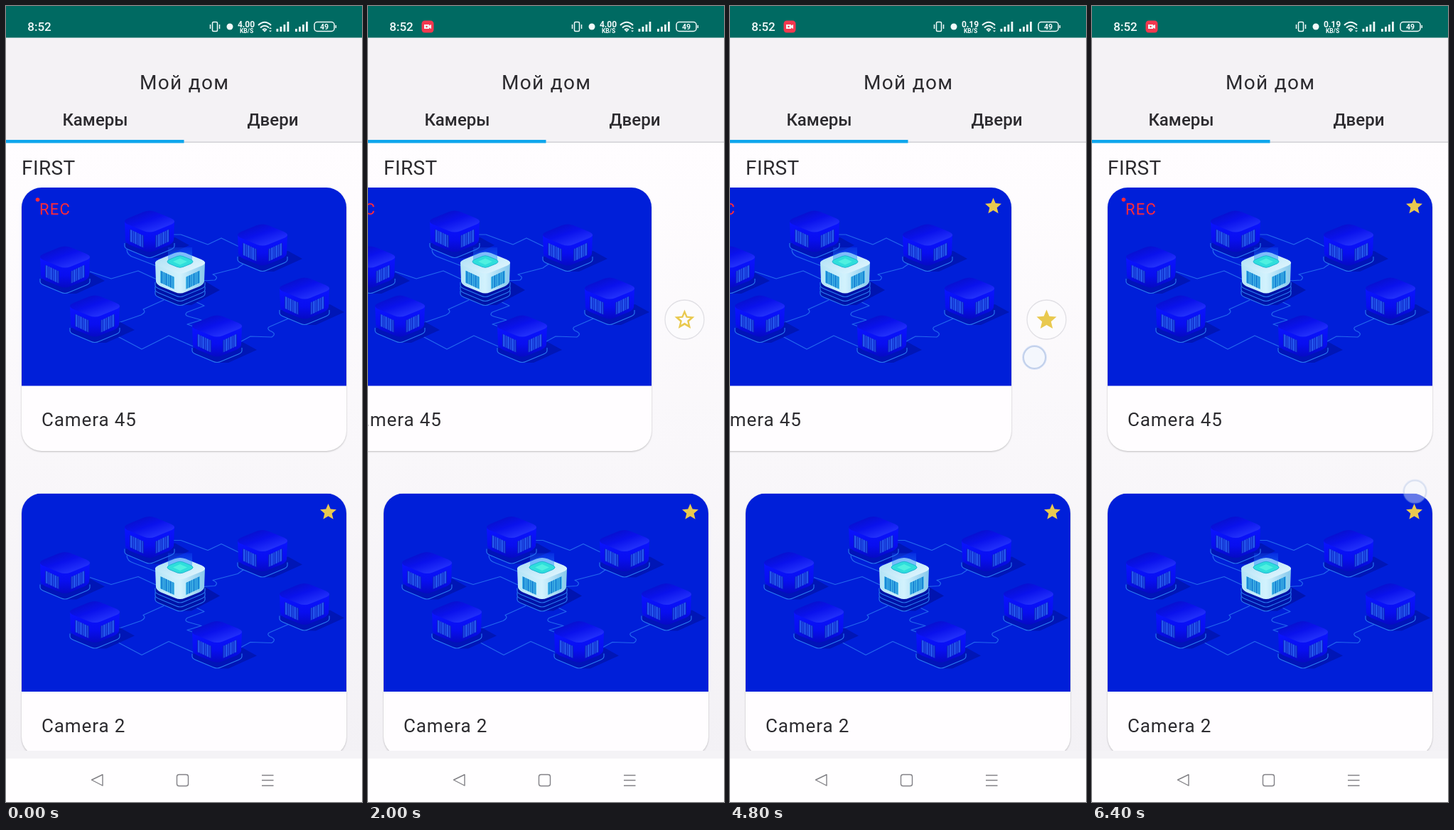
An HTML page that plays this animation: 501x1118 px, repeating every 6.5 s.

```html
<!DOCTYPE html>
<html lang="ru">
<head>
<meta charset="utf-8">
<title>Мой дом</title>
<style>
  html, body { margin: 0; height: 100%; overflow: hidden; background: #f4f3f6; }
  svg { display: block; width: 100%; height: 100%; font-family: Roboto, sans-serif; fill: #2c2b2f; }
  .title { font-size: 28px; letter-spacing: 1.3px; }
  .section { font-size: 28px; letter-spacing: .4px; }
  .tab { font-size: 24px; font-weight: 500; text-anchor: middle; }
  .name { font-size: 26px; letter-spacing: .9px; }
  .rec { font-size: 22px; letter-spacing: 1.2px; fill: #ff2b38; }
  .status { fill: #f2fafa; }
  .status text { font-weight: 700; text-anchor: middle; }
  .line { fill: none; stroke: #f2fafa; stroke-width: 1.5; }
  .nav { fill: none; stroke: #828186; stroke-width: 1.4; }
  .card { filter: drop-shadow(0 1px 1px rgba(0, 0, 0, .24)); }
  .star { fill: #e9c94f; }
  .blue { --top: url(#blueTop); --side: url(#blueSide); --panel: #0c22c4; --bars: #2457ee; --base: #0014b8; }
  .white { --top: url(#whiteTop); --side: url(#whiteSide); --panel: #4fc0ea; --bars: #1a86d6; --base: #0013a8; }
</style>
</head>
<body>
<svg viewBox="0 0 501 1118">
  <defs>
    <linearGradient id="page" x2="0" y2="1">
      <stop stop-color="#fffdff"/><stop offset="1" stop-color="#f3f1f5"/>
    </linearGradient>
    <linearGradient id="blueTop" x2=".8" y2="1">
      <stop stop-color="#0510bc"/><stop offset=".5" stop-color="#0a12ec"/><stop offset="1" stop-color="#2b3cff"/>
    </linearGradient>
    <linearGradient id="blueSide" x2="0" y2="1">
      <stop stop-color="#0a14ff"/><stop offset=".6" stop-color="#080ef0"/><stop offset="1" stop-color="#060ac4"/>
    </linearGradient>
    <linearGradient id="whiteTop" x2="1" y2="1">
      <stop stop-color="#a9def4"/><stop offset="1" stop-color="#e6f8ff"/>
    </linearGradient>
    <linearGradient id="whiteSide">
      <stop stop-color="#b4e4f6"/><stop offset=".5" stop-color="#d2f2fd"/><stop offset="1" stop-color="#86c8ec"/>
    </linearGradient>
    <linearGradient id="beam" x2="0" y2="1">
      <stop stop-color="#1a60ff" stop-opacity=".25"/><stop offset="1" stop-color="#28a0ff" stop-opacity=".55"/>
    </linearGradient>
    <clipPath id="photo"><path d="M22 533.600V283a28 28 0 0 1 28-28H451a28 28 0 0 1 28 28V533.600z"/></clipPath>

    <path id="star" d="M0-10 2.8-3.4 10-2.8 4.5 2 6.2 9 0 5.3-6.2 9-4.5 2-10-2.8-2.8-3.4z"/>
    <g id="panel" transform="skewY(25)" stroke-width="17">
      <path d="M-28 48H-8" style="stroke:var(--panel)"/>
      <path d="M-27 48H-9" stroke-dasharray="2.600 1.200 1.400 1" style="stroke:var(--bars)"/>
    </g>
    <g id="body">
      <path d="M-35 15-34 42Q-33 46-27 49L-7 57Q0 60 7 57L27 49Q33 46 34 42L35 15z" style="fill:var(--side)"/>
      <use href="#panel"/><use href="#panel" transform="scale(-1 1)"/>
      <path d="M-30 11-8 2Q0-1 8 2L30 11Q40 15.500 30 20L8 29Q0 32-8 29L-30 20Q-40 15.500-30 11z" style="fill:var(--top)"/>
    </g>
    <path id="plate" d="M-35 46v4Q-35 53-30 55L-6 65Q0 68 6 65L30 55Q35 53 35 50v-4" stroke="#2b7df2" stroke-width="1.1" style="fill:var(--base)"/>
    <g id="cube">
      <path d="M0 67 16 67 56 49 36 38-20 50z" fill="#0016b6"/>
      <use href="#plate"/><use href="#body"/>
    </g>

    <g id="scene" clip-path="url(#photo)">
      <path d="M22 255H479V534H22z" fill="#001fd9"/>
      <path fill="none" stroke="#2468ee" stroke-width="1.2" stroke-linejoin="round"
        d="M236 321H246L284 335 303 326 328 338M118 373 148 383 186 372 212 384M170 342Q170 350 180 353L214 366
           M158 445 190 434Q198 430 193 426L222 413M157 464 191 482 229 463 263 478M262 413 279 421 255 430Q250 434 257 436L275 441 255 447 292 460
           M277 386 294 385Q300 381 291 377L326 368 336 361M331 471 344 464 374 465Q382 460 371 456 366 452 372 450L402 437"/>
      <g class="blue">
        <use href="#cube" x="202" y="287"/><use href="#cube" x="361" y="306"/><use href="#cube" x="83" y="337"/>
      </g>
      <g class="white" transform="translate(245 345)">
        <path d="M0 75H16L56 54 36 42-30 54z" fill="#0014b0"/>
        <use href="#plate" y="9"/><use href="#plate" y="3"/><use href="#plate" y="-3"/>
        <use href="#body"/>
        <path d="M-17-6H17V14H-17z" fill="url(#beam)"/>
        <path d="M-15 11-4 6.500Q0 5 4 6.500L15 11Q21 14 15 17L4 21.500Q0 23-4 21.500L-15 17Q-21 14-15 11z" fill="#2fdedb" stroke="#1fb4d4"/>
        <path d="M-10 14 0 9.500 10 14 0 18.500z" fill="#4ff0e0"/>
      </g>
      <g class="blue">
        <use href="#cube" x="420" y="381"/><use href="#cube" x="125" y="406"/><use href="#cube" x="297" y="434"/>
      </g>
    </g>
    <g id="card">
      <rect class="card" x="22" y="255" width="457" height="370" rx="28" fill="#fffdff"/>
      <use href="#scene"/>
    </g>
    <path id="bars" d="M0 32h2.800v4H0zM5 29h2.800v7H5zM10 26h2.800v10H10zM15 22h2.800v14H15z"/>
  </defs>

  <rect width="501" height="1118" fill="#f4f3f6"/>
  <rect y="192" width="501" height="865" fill="url(#page)"/>
  <text class="section" x="22" y="237">FIRST</text>

  <g transform="translate(445.500 440.500)">
    <circle r="27.500" fill="#fcfbfd" stroke="#e1e0e5" stroke-width="1.300"/>
    <use class="star" href="#star" transform="scale(1.400)"/>
    <use id="hole" href="#star" transform="scale(.800)" fill="#fcfbfd"/>
    <circle id="ripple" r="27.500" fill="#007f80"/>
  </g>

  <g id="slider">
    <use href="#card"/>
    <circle cx="44.500" cy="272" r="2.800" fill="#ff2b38"/>
    <text class="rec" x="47" y="293">REC</text>
    <use id="favorite" class="star" href="#star" transform="translate(453.500 281) scale(1.150)"/>
    <text class="name" x="50" y="590">Camera 45</text>
  </g>
  <g transform="translate(0 429.500)">
    <use href="#card"/>
    <use class="star" href="#star" transform="translate(453.500 281) scale(1.150)"/>
    <text class="name" x="50" y="590">Camera 2</text>
  </g>

  <rect y="1046" width="501" height="11" fill="#f4f3f6"/>
  <rect y="1057" width="501" height="61" fill="#fffeff"/>
  <path class="nav" stroke-linejoin="round" d="M120.500 1087 136 1079.500V1095zM360 1080.500h16.500M360 1087.500h16.500M360 1095h16.500"/>
  <rect class="nav" x="240.500" y="1079.500" width="16" height="16" rx="3"/>

  <rect y="44" width="501" height="148" fill="#f4f2f5"/>
  <text class="title" x="188" y="117">Мой дом</text>
  <text class="tab" x="125.500" y="168">Камеры</text>
  <text class="tab" x="375.500" y="168">Двери</text>
  <rect x="250" y="190.500" width="251" height="1.500" fill="#d2d1d6"/>
  <rect y="188" width="250.500" height="4.500" fill="#0fa6ec"/>

  <rect width="501" height="44.500" fill="#006a62"/>
  <g class="status">
    <text x="47" y="35" font-size="17" style="font-weight:500">8:52</text>
    <g id="recorder">
      <rect x="75.500" y="20.500" width="17" height="17" rx="4.500" fill="#f2384f"/>
      <path d="M79 26h7v1.500l3-1.500v6l-3-1.500V32h-7z"/>
      <circle cx="82.500" cy="29" r="1.200" fill="#f2384f"/>
    </g>
    <rect class="line" x="290.500" y="22.500" width="7" height="13" rx="1.500"/>
    <path class="line" d="M287.500 26v6M300.500 26v6"/>
    <circle cx="315" cy="29" r="4.500"/>
    <text id="speed" x="338" y="30" font-size="12">4.00</text>
    <text x="338.500" y="38" font-size="8.500">KB/S</text>
    <path class="line" d="M355 27Q364 18.500 373 27M358 30.500Q364 25 370 30.500M361 33.500Q364 31 367 33.500" style="stroke-width:2.100"/>
    <path d="M361.500 34 364 36.500 366.500 34zM370 32l2-2 2 2zM370 34.500l2 2 2-2z"/>
    <use href="#bars" x="380.500"/><use href="#bars" x="407"/>
    <rect class="line" x="434" y="22.500" width="28" height="13" rx="4"/>
    <path d="M463.500 27h1.500v4h-1.500z"/>
    <text x="448" y="33" font-size="10.500">49</text>
  </g>

  <g id="touch">
    <circle r="17.500" fill="#86aef0" opacity=".25"/>
    <circle r="15.500" fill="#fff" fill-opacity=".68" stroke="#b4c6e6" stroke-opacity=".75" stroke-width="2"/>
  </g>
</svg>
<script>
  const LOOP = 6500, STEP = 100;
  const el = id => document.getElementById(id);
  const show = (id, value) => el(id).setAttribute('opacity', value);
  const move = (id, x, y) => el(id).setAttribute('transform', `translate(${x} ${y})`);

  // Linear interpolation through [time, value] pairs, held at both ends
  function track(t, keys) {
    const i = keys.findIndex(([time]) => time > t);
    if (i === 0) return keys[0][1];
    if (i < 0) return keys[keys.length - 1][1];
    const [t0, v0] = keys[i - 1], [t1, v1] = keys[i];
    return v0 + (v1 - v0) * (t - t0) / (t1 - t0);
  }

  const SLIDE = [[1450, 0], [1600, -22], [1800, -66], [1900, -75], [2000, -80], [2100, -82], [2200, -83],
                 [4800, -83], [4900, -62], [5000, -28], [5100, -8], [5200, -1.5], [5300, 0]];
  const TOUCH = [[1300, 0], [1400, 1], [1700, 1], [1900, 0], [2400, 0], [2500, 1], [2600, 1], [2800, 0],
                 [4600, 0], [4800, 1], [5000, 1], [5200, 0], [6200, 0], [6400, .55]];
  const RIPPLE = [[2500, 0], [2700, .18], [2800, .18], [3100, 0]];

  function touchPoint(t, slide) {
    if (t < 2300) return [438.5 + slide, 523];
    if (t < 3500) return [446, 446];
    if (t < 5500) return [428.5 + (slide + 83) * .35, 493.5];
    return [454.5, 682];
  }

  function draw() {
    const t = Math.floor(performance.now() % LOOP / STEP) * STEP;
    const slide = track(t, SLIDE), liked = t >= 2700;
    move('slider', slide, 0);
    move('touch', ...touchPoint(t, slide));
    show('touch', track(t, TOUCH));
    show('ripple', track(t, RIPPLE));
    show('recorder', track(t, [[600, 0], [900, 1]]));
    show('hole', liked ? 0 : 1);
    show('favorite', liked ? 1 : 0);
    el('speed').textContent = t < 3300 ? '4.00' : '0.19';
    requestAnimationFrame(draw);
  }
  draw();
</script>
</body>
</html>
```
